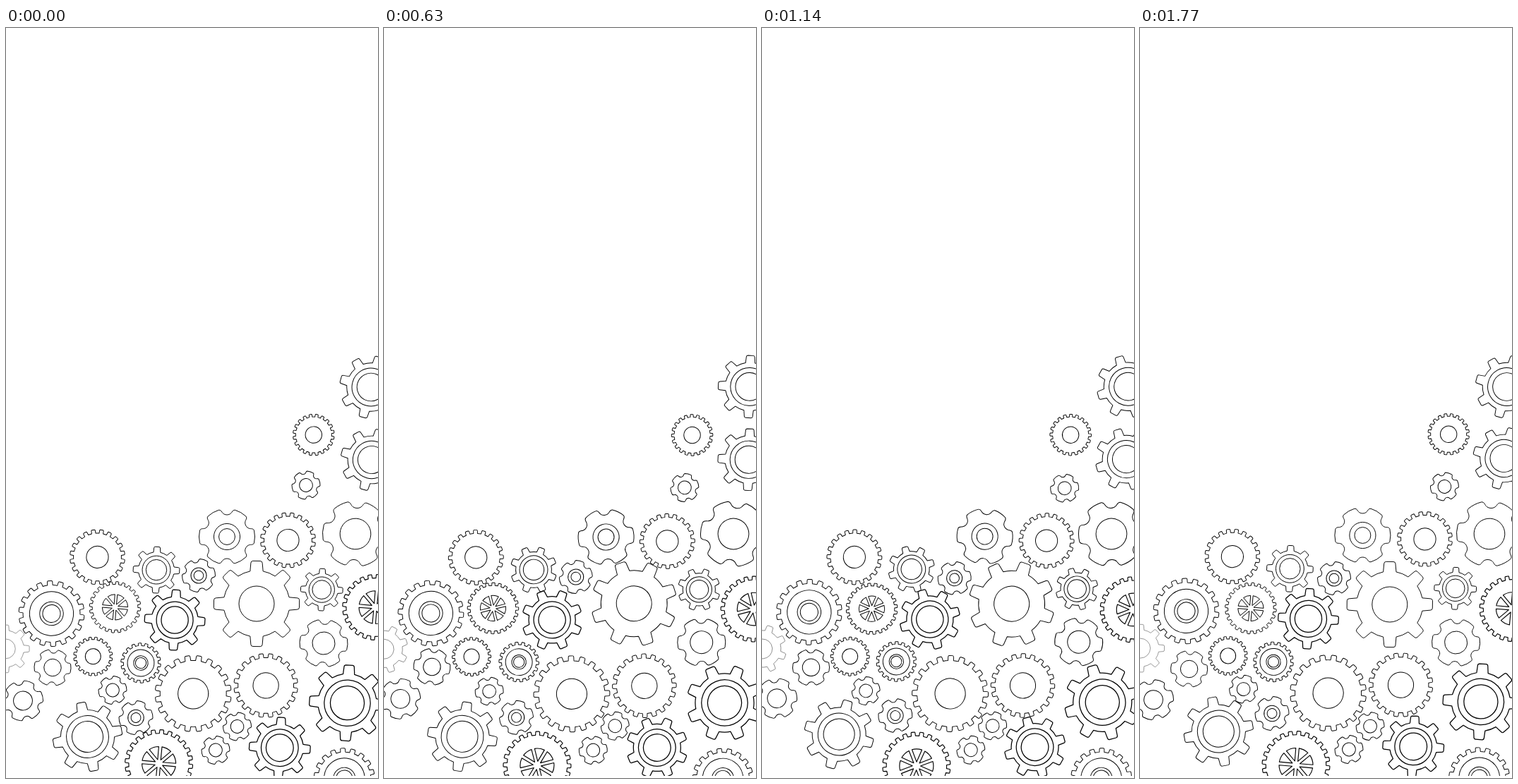
An HTML page with a canvas for the animation above (1.8 s loop, 527 px wide and 1063 px high).

```html
<!DOCTYPE html>
<html lang="en">
<head>
<meta charset="utf-8">
<title>Turning gears</title>
<style>
  html, body { margin: 0; width: 100%; height: 100%; overflow: hidden; background: #fff; }
  canvas { display: block; }
</style>
</head>
<body>
<canvas id="stage" width="527" height="1063"></canvas>
<script>
const ctx = document.getElementById('stage').getContext('2d');
const LOOP = 1800, STEP = 30, LAST = LOOP / STEP - 1, TAU = Math.PI * 2;
const rad = deg => deg * Math.PI / 180;
const polar = (r, deg) => [r * Math.cos(rad(deg)), r * Math.sin(rad(deg))];

// Unit-radius outlines, scaled to each gear when drawn.
function toothed(count, root, round) {
  const path = new Path2D(), pitch = 360 / count;
  const tip = pitch * (count > 8 ? 0.22 : 0.165), base = pitch * (count > 8 ? 0.27 : 0.25);
  for (let a = 0; a < 360; a += pitch) {
    path.arc(0, 0, root, rad(a - pitch + base), rad(a - base));
    path.arcTo(...polar(1, a - tip), ...polar(1, a), round);
    path.arcTo(...polar(1, a + tip), ...polar(root, a + base), round);
    path.lineTo(...polar(root, a + base));
  }
  path.closePath();
  return path;
}

function notched() {
  const path = new Path2D();
  for (let a = 0; a < 360; a += 60) {
    path.arc(0, 0, 1, rad(a - 13), rad(a + 13));
    path.bezierCurveTo(...polar(0.99, a + 18), ...polar(0.9, a + 18), ...polar(0.86, a + 20));
    path.bezierCurveTo(...polar(0.77, a + 24), ...polar(0.77, a + 36), ...polar(0.86, a + 40));
    path.bezierCurveTo(...polar(0.9, a + 42), ...polar(0.99, a + 42), ...polar(1, a + 47));
  }
  path.closePath();
  return path;
}

function rings(path, ...radii) {
  for (const r of radii) {
    path.moveTo(r, 0);
    path.arc(0, 0, r, 0, TAU);
  }
  return path;
}

function wedges(path) {
  for (let a = 22.5; a < 360; a += 45) {
    path.moveTo(...polar(0.12, a));
    path.arc(0, 0, 0.5, rad(a - 17), rad(a + 17));
    path.closePath();
  }
  return path;
}

const gears = [];

// Each place is the pivot x, y and the radius, then its own off-centre shift if it wobbles more.
function add(shape, style, ...places) {
  for (const [x, y, r, ...own] of places) {
    const shift = own.length ? own : style.shift || [-0.7, 0.4];
    gears.push({ shape, x, y, r, turn: -1, tilt: 0, width: 0.95, ...style, shift });
  }
}

const cog = () => toothed(8, 0.77, 0.05);
const ringCog = rings(cog(), 0.445, 0.605);
const plainCog = rings(cog(), 0.41);
const nut = rings(notched(), 0.47);
const wheel = wedges(toothed(24, 0.89, 0.02));
const sway = { turn: 1, shift: [0.3, 0.9] };
const small = -12;

add(plainCog, { shift: [0.6, -0.5] }, [354.4, 816.5, 61]);
add(plainCog, { width: 0.4 }, [0, 879.5, 34]);
add(ringCog, { ...sway, tilt: 2 }, [212.7, 767.2, 33], [447, 795.2, 30]);
add(ringCog, { ...sway, tilt: 3, width: 1.25 },
  [238.8, 838.2, 43], [387.5, 1019.3, 43.5], [483.2, 955.8, 54]);
add(ringCog, { ...sway, tilt: -11 }, [113.4, 1000.8, 49.5, 2.1, 3.7]);
add(ringCog, { turn: 0.5, tilt: 15 }, [518.5, 510, 44.5, -1.5, -1], [517.8, 609.8, 44, 0.2, 2.2]);

add(nut, { turn: 1, tilt: 3 }, [495, 717, 46.5, 0, 0], [67.8, 907.5, 26, -1.8, -1]);
add(nut, { turn: 1, tilt: small }, [148.8, 937.8, 20, 2.2, 0.7], [296.5, 1023, 20, 0.5, 0.5]);
add(nut, { tilt: 3 }, [448.8, 871.5, 34, 1.2, 0.5]);
add(nut, { tilt: small, shift: [0.7, 0.2] },
  [428.2, 649, 20, -3.2, -1], [21.5, 952.8, 28.5, 2.5, 0.7], [326.8, 989.8, 20]);

const ringNut = rings(notched(), 0.29, 0.47);
add(ringNut, {}, [314.2, 720, 39.5, -1.2, 1]);
add(ringNut, { tilt: small }, [274, 778, 23.5, -1, -2], [185.5, 974.5, 24, -1.5, 3]);

add(rings(toothed(20, 0.87, 0.03), 0.4), { tilt: 9 },
  [436.5, 576.2, 29.3], [401.5, 725.2, 39, -2, 0.8], [130.2, 749.5, 39],
  [124, 890.3, 27.5], [265.9, 943, 54], [368.8, 931.5, 45.3]);
add(rings(toothed(18, 0.87, 0.03), 0.27, 0.36, 0.67), { tilt: 7 },
  [65, 828.2, 46.5, -0.5, 1.8], [190, 899.2, 28.3, 1, 0.8], [480, 1063.2, 43]);

add(wheel, { tilt: 5, shift: [-1.2, -0.8] }, [155.7, 821.7, 36.3]);
add(wheel, { tilt: 5, width: 1.15, shift: [-2.2, -1] }, [525.5, 822, 46.5], [218.8, 1043.5, 48]);

function drawGear({ shape, x, y, r, shift, tilt, turn, width }, progress) {
  ctx.save();
  ctx.translate(x, y);
  ctx.rotate(turn * Math.PI * progress);
  ctx.translate(...shift);
  ctx.rotate(rad(tilt));
  ctx.scale(r, r);
  ctx.lineWidth = width / r;
  ctx.stroke(shape);
  ctx.restore();
}

function draw(now) {
  const progress = Math.floor(now % LOOP / STEP) / LAST;
  ctx.fillStyle = '#fff';
  ctx.fillRect(0, 0, 527, 1063);
  ctx.save();
  ctx.beginPath();
  ctx.rect(0, 0, 527, 1060);
  ctx.clip();
  ctx.strokeStyle = '#000';
  ctx.lineJoin = 'round';
  for (const gear of gears) drawGear(gear, progress);
  ctx.restore();
}

const start = performance.now();
function tick() {
  draw(performance.now() - start);
  requestAnimationFrame(tick);
}
tick();
</script>
</body>
</html>
```
